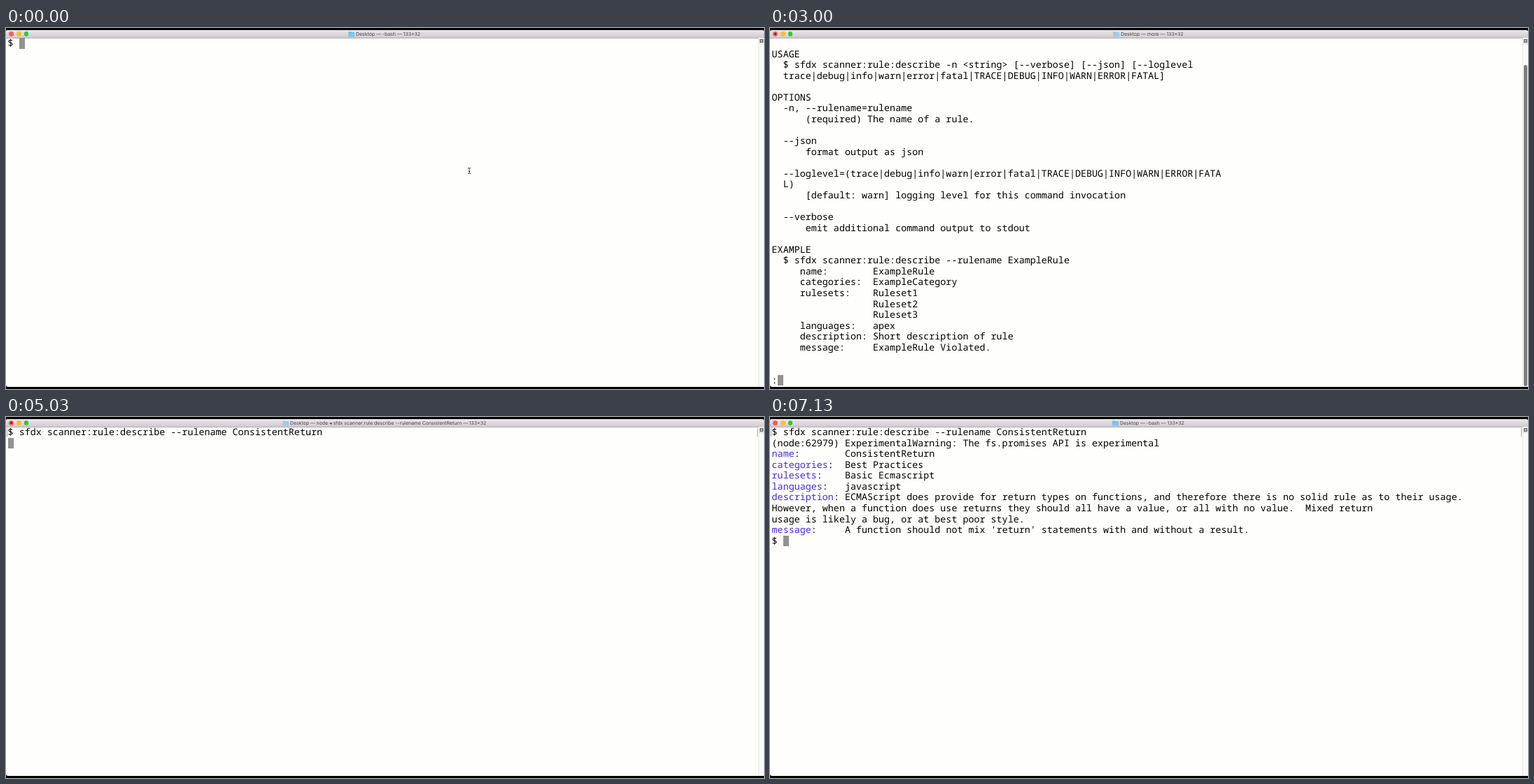
An HTML page for the animation above (8.66 s loop, 1083 by 517 pixels).

```html
<!DOCTYPE html>
<html lang="en">
<head>
<meta charset="utf-8">
<title>Terminal</title>
<style>
  html, body { margin: 0; width: 100%; height: 100%; overflow: hidden; background: #000; }
  #stage { position: relative; width: 1083px; height: 517px; overflow: hidden; text-rendering: geometricPrecision; }
  #stage * { position: absolute; box-sizing: border-box; }
  #window { left: 0; top: 3px; width: 1083px; height: 511px; background: #fefefc; border-radius: 3px; overflow: hidden; }
  #bar { left: 0; top: 3px; width: 1083px; height: 11.5px; border-radius: 3px 3px 0 0;
    background: linear-gradient(#ebe6eb, #d0cbd0); border-bottom: 1px solid #b5b0b5; }
  #title { left: 0; top: 3px; width: 1081px; height: 11px; display: flex; justify-content: center; align-items: center;
    gap: 2px; font: 6.9px/11px Inter, Roboto, sans-serif; color: #444; white-space: pre; }
  #stage #title * { position: static; }
  .light { top: 5.3px; width: 6.8px; height: 6.8px; border-radius: 50%; }
  #dot { left: 6.2px; top: 7.4px; width: 2.6px; height: 2.6px; border-radius: 50%; background: #8c1a10; }
  #text { left: 2.6px; top: 14.1px; margin: 0; color: #000; white-space: pre;
    font: 500 13.393px/15.567px "Noto Sans Mono", "DejaVu Sans Mono", monospace; }
  #stage #text * { position: static; }
  #text b { font-weight: inherit; color: #4a27dc; }
  #cursor { width: 8.3px; height: 15.567px; background: #929292; }
  .mark { top: 16px; width: 1px; height: 12px; background: #a8a8a8; }
  #track { left: 1075px; top: 14px; width: 8px; height: 500px; background: #fafafa; border-left: 1px solid #e6e6e6; }
  #split { left: 1075px; top: 14px; width: 8px; height: 9px; background: #f0f0f0; border: 1px solid #ddd; border-width: 0 0 1px 1px; }
  #split i { left: 1px; top: 2px; width: 5px; height: 5px; border: 1px solid #666; background: #aaa; }
  #thumb { left: 1077px; width: 4.5px; border-radius: 2.2px; background: #7e7e7e; }
  #pointer { left: 659px; top: 200px; }
</style>
</head>
<body>
<div id="stage">
  <div id="window"></div>
  <div id="bar"></div>
  <i class="light" style="left:4.1px;background:#fc5b56"></i>
  <i class="light" style="left:14.8px;background:#fdbb2d"></i>
  <i class="light" style="left:25.5px;background:#2bc840"></i>
  <i id="dot"></i>
  <div id="title">
    <svg id="folder" width="9" height="8"><path d="M.3 1.2Q.3.5 1 .5H3.4L4.2 1.3H8Q8.7 1.3 8.7 2V6.7Q8.7 7.4 8 7.4H1Q.3 7.4.3 6.7Z" fill="#58b4e5"/><path d="M.3 2.5H8.7V6.7Q8.7 7.4 8 7.4H1Q.3 7.4.3 6.7Z" fill="#7dcaf2"/></svg>
    <span id="caption"></span>
  </div>
  <div id="track"></div>
  <div id="split"><i></i></div>
  <div id="cursor"></div>
  <pre id="text"></pre>
  <div id="marks"><i class="mark" style="left:1px"></i><i class="mark" style="left:1073px"></i></div>
  <div id="thumb"></div>
  <svg id="pointer" width="6" height="9"><path d="M1 .5H2.3L3 1.2 3.7.5H5M3 1V8M1 8.5H2.3L3 7.8 3.7 8.5H5M2 5.5H4" fill="none" stroke="#222" stroke-width=".9"/></svg>
</div>
<script>
const LOOP = 8660, COLUMN = 8.036, ROW = 15.567, LEFT = 2.6, TOP = 14.1;
const $ = id => document.getElementById(id);

const PROMPT = '$ ';
const HELP_COMMAND = '$ sfdx scanner:rule:describe --help | more';
const RULE_COMMAND = '$ sfdx scanner:rule:describe --rulename ConsistentReturn';
const WARNING = '(node:62979) ExperimentalWarning: The fs.promises API is experimental';

const HELP = `Provide detailed information about a rule.

USAGE
  $ sfdx scanner:rule:describe -n <string> [--verbose] [--json] [--loglevel
  trace|debug|info|warn|error|fatal|TRACE|DEBUG|INFO|WARN|ERROR|FATAL]

OPTIONS
  -n, --rulename=rulename
      (required) The name of a rule.

  --json
      format output as json

  --loglevel=(trace|debug|info|warn|error|fatal|TRACE|DEBUG|INFO|WARN|ERROR|FATA
  L)
      [default: warn] logging level for this command invocation

  --verbose
      emit additional command output to stdout

EXAMPLE
  $ sfdx scanner:rule:describe --rulename ExampleRule
     name:        ExampleRule
     categories:  ExampleCategory
     rulesets:    Ruleset1
                  Ruleset2
                  Ruleset3
     languages:   apex
     description: Short description of rule
     message:     ExampleRule Violated.`.split('\n');

const RESULT = `name:        ConsistentReturn
categories:  Best Practices
rulesets:    Basic Ecmascript
languages:   javascript
description: ECMAScript does provide for return types on functions, and therefore there is no solid rule as to their usage.
However, when a function does use returns they should all have a value, or all with no value.  Mixed return
usage is likely a bug, or at best poor style.
message:     A function should not mix 'return' statements with and without a result.`.split('\n');

// Puts a last line on the bottom row of the 32-row screen.
const paged = (skip, last) => {
  const lines = HELP.slice(skip);
  return [...lines, ...Array(31 - lines.length).fill(''), last];
};
const running = process => ({ process, busy: true });
const idle = { process: '-bash', busy: false };
const ruleRun = [RULE_COMMAND, WARNING];

// Each step changes only the named properties; the cursor follows the last line.
const steps = [
  [0, { ...idle, lines: [PROMPT], pointer: true, marks: false, thumb: 0 }],
  [700, { lines: [HELP_COMMAND] }],
  [730, { pointer: false }],
  [1700, { lines: [HELP_COMMAND, ''], marks: true }],
  [1800, running('more')],
  [2200, { lines: paged(0, ':'), marks: false, thumb: 39 }],
  [3000, { lines: paged(1, ':'), thumb: 53 }],
  [3500, { lines: paged(1, '') }],
  [3570, { lines: paged(1, PROMPT) }],
  [3630, idle],
  [3960, { lines: [RULE_COMMAND], thumb: 0 }],
  [4930, { lines: [RULE_COMMAND, ''], marks: true }],
  [5030, running('node ◂ ' + RULE_COMMAND.slice(2))],
  [5900, { lines: [...ruleRun, ''] }],
  [6000, running('java ◂ ' + RULE_COMMAND.slice(2))],
  [6960, { lines: [...ruleRun, ...RESULT, ''] }],
  [7070, { lines: [...ruleRun, ...RESULT, PROMPT] }],
  [7130, idle],
];
let state = {};
const scenes = steps.map(([time, change]) => ({ time, ...(state = { ...state, ...change }) }));

const show = (id, visible) => { $(id).style.display = visible ? '' : 'none'; };
const escapeHtml = text => text.replace(/&/g, '&amp;').replace(/</g, '&lt;');

function render({ lines, process, busy, pointer, marks, thumb }) {
  $('text').innerHTML = lines.map(line => escapeHtml(line).replace(/^[a-z]+(?=:)/, '<b>$&</b>')).join('\n');
  $('cursor').style.left = LEFT + lines.at(-1).length * COLUMN + 'px';
  $('cursor').style.top = TOP + (lines.length - 1) * ROW + 'px';
  $('caption').textContent = `Desktop — ${process} — 133×32`;
  $('folder').style.opacity = busy ? 0.6 : 1;
  $('thumb').style.top = thumb + 'px';
  $('thumb').style.height = 513 - thumb + 'px';
  show('dot', busy);
  show('pointer', pointer);
  show('marks', marks);
  show('thumb', thumb);
}

const start = performance.now();
let current;
function tick() {
  const time = (performance.now() - start) % LOOP;
  const scene = scenes.findLast(s => s.time <= time);
  if (scene !== current) render(current = scene);
  requestAnimationFrame(tick);
}
tick();
</script>
</body>
</html>
```
